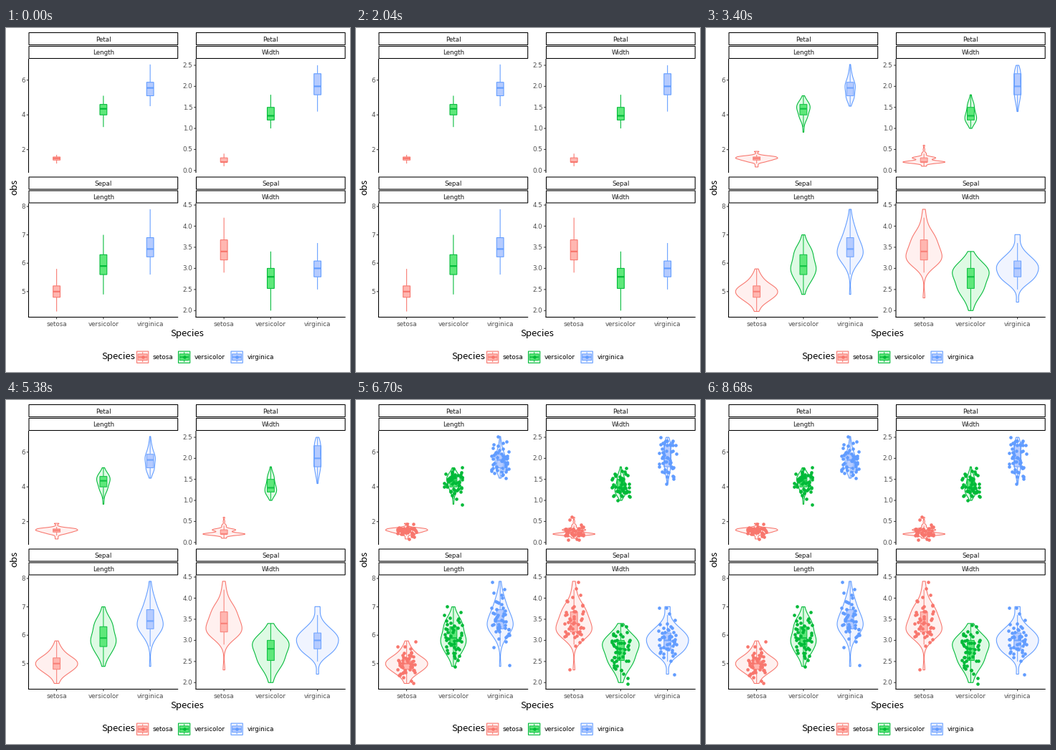
A matplotlib script that plays this animation: 480 by 480 pixels, repeating every 10 s.

```python
import numpy as np
import matplotlib.pyplot as plt
from matplotlib.animation import FuncAnimation
from matplotlib.colors import to_rgba
from matplotlib.patches import Rectangle

SIZE, DPI = 480, 72          # at 72 dpi one point is one pixel
STEP, LOOP = 100, 10000      # ms
VIOLINS_AT, DOTS_AT = 3400, 6700

SPECIES = ["setosa", "versicolor", "virginica"]
LINES = ["#F8766D", "#00BA38", "#619CFF"]
FILLS = ["#FFB6B0", "#5EE87A", "#B5CBFF"]
VEIL = 0.2                   # opacity of the violin fill
THIN, THICK = 1.07, 2.13
PITCH = 65.25                # distance between two categories
COUNT = 50                   # values per group
TITLE = dict(size=13.2, color="black", family="Noto Sans CJK JP")

plt.rcParams["font.family"] = "DejaVu Sans"
plt.rcParams["path.snap"] = False
fig = plt.figure(figsize=(SIZE / DPI, SIZE / DPI), dpi=DPI, facecolor="white")
ax = fig.add_axes([0, 0, 1, 1])
ax.set(xlim=(0, SIZE), ylim=(SIZE, 0))
ax.axis("off")
rng = np.random.default_rng(7)
violins, dots = [], []


def line(x, y, color, width=THIN, z=1, **kw):
    return ax.plot(x, y, color=color, lw=width, zorder=z,
                   solid_capstyle="butt", **kw)[0]


def box(x0, y0, x1, y1, edge, fill="none", z=1):
    ax.add_patch(Rectangle((x0, y0), x1 - x0, y1 - y0, ec=edge, fc=fill,
                           lw=THIN, zorder=z, joinstyle="miter"))


def label(x, y, text, size=8.8, color="#4D4D4D", ha="center", **kw):
    ax.text(x, y, text, fontsize=size, color=color, ha=ha,
            va="baseline", **kw)


def dot(x, y, color):
    return line(x, y, color, 0, 4, marker="o", ms=4.6, mew=0)


def sample(summary, outliers):
    """Bell-shaped values, rounded to 0.1, that follow a box summary."""
    z = np.linspace(-3, 3, 601)
    cdf = np.cumsum(np.exp(-z * z / 2))
    n = COUNT - len(outliers)
    scores = np.interp((np.arange(n) + 0.5) / n, cdf / cdf[-1], z)
    knots = [scores[0], -0.674, 0, 0.674, scores[-1]]
    body = np.interp(scores, knots, summary).round(1)
    return np.sort(np.r_[body, outliers])


def density(v, iqr):
    """Gaussian kernel density over the range of the values."""
    bw = 0.9 * min(v.std(ddof=1), iqr / 1.34) * len(v) ** -0.2
    grid = np.linspace(v[0], v[-1], 256)
    bell = np.exp(-0.5 * ((grid[:, None] - v) / bw) ** 2)
    return grid, bell.sum(1) / bw


def boxplot(x, summary, to_y, color, fill):
    low, q1, mid, q3, high = map(to_y, summary)
    half = 0.075 * PITCH
    line([x, x], [low, q1], color)
    line([x, x], [q3, high], color)
    box(x - half, q3, x + half, q1, color, fill)
    line([x - half, x + half], [mid, mid], color, THICK)


def violin(x, grid, half, to_y, color, fill):
    xs = np.r_[x - half, (x + half)[::-1]]
    ys = to_y(np.r_[grid, grid[::-1]])
    violins.extend(ax.fill(xs, ys, fc=to_rgba(fill, VEIL), ec=color,
                           lw=THIN, zorder=2))


def jitter(x, v, to_y, color):
    dx = rng.uniform(-0.2, 0.2, len(v)) * PITCH
    dy = rng.uniform(-0.04, 0.04, len(v))
    dots.append(dot(x + dx, to_y(v + dy), color))


def panel(left, top, names, ticks, y_first, unit, groups):
    """One facet; each group is (box summary, outliers)."""
    right, bottom = left + 208.7, top + 159

    def to_y(v):
        return y_first - (v - ticks[0]) * unit

    for i, name in enumerate(names):
        y = top - 36.5 + 19 * i
        box(left + 0.5, y, right - 0.5, y + 17, "black")
        label((left + right) / 2, y + 12.4 - 0.6 * i, name, color="#1A1A1A")

    line([left, left], [top, bottom], "black")
    for t in ticks:
        line([left - 2.75, left], [to_y(t)] * 2, "#333333")
        label(left - 4.6, to_y(t) + 3, f"{t}", ha="right")

    centers = left + PITCH * (0.6 + np.arange(3))
    if top > SIZE / 2:
        line([left - 0.5, right], [bottom, bottom], "black")
        for x, name in zip(centers, SPECIES):
            line([x, x], [bottom, bottom + 2.75], "#333333")
            label(x, bottom + 12.4, name)

    values = [sample(*group) for group in groups]
    shapes = [density(v, s[3] - s[1]) for v, (s, _) in zip(values, groups)]
    peak = max(d.max() for _, d in shapes)
    for x, v, (grid, d), (summary, _), color, fill in zip(
            centers, values, shapes, groups, LINES, FILLS):
        boxplot(x, summary, to_y, color, fill)
        violin(x, grid, 0.45 * PITCH * d / peak, to_y, color, fill)
        jitter(x, v, to_y, color)


def legend_key(x, y, color, fill):
    s = 17.28
    cx, cy = x + s / 2, y + s / 2
    for a, b in ((0.1, 0.25), (0.75, 0.9)):
        line([cx, cx], [y + a * s, y + b * s], color)
    box(x + 0.125 * s, y + 0.25 * s, x + 0.875 * s, y + 0.75 * s, color, fill)
    line([x + 0.125 * s, x + 0.875 * s], [cy, cy], color, THICK)
    box(x + 0.5, y + 0.5, x + s - 0.5, y + s - 0.5, color,
        to_rgba(fill, VEIL), 2)
    dot([cx], [cy], color)


panel(31.5, 43, ["Petal", "Length"], range(2, 7, 2), 169.7, 24.25, [
    ((1.2, 1.4, 1.5, 1.575, 1.7), (1.0, 1.1, 1.9, 1.9)),
    ((3.3, 4.0, 4.35, 4.6, 5.1), (3.0,)),
    ((4.5, 5.1, 5.55, 5.875, 6.9), ()),
])
panel(265, 43, ["Petal", "Width"], np.arange(0, 2.6, 0.5), 198.8, 58.7, [
    ((0.1, 0.2, 0.2, 0.3, 0.4), (0.5, 0.6)),
    ((1.0, 1.2, 1.3, 1.5, 1.8), ()),
    ((1.4, 1.8, 2.0, 2.3, 2.5), ()),
])
panel(31.5, 244.5, ["Sepal", "Length"], range(5, 9), 367.8, 39.6, [
    ((4.3, 4.8, 5.0, 5.2, 5.8), ()),
    ((4.9, 5.6, 5.9, 6.3, 7.0), ()),
    ((5.6, 6.225, 6.5, 6.9, 7.9), (4.9,)),
])
panel(265, 244.5, ["Sepal", "Width"], np.arange(2, 4.6, 0.5), 394.3, 58.9, [
    ((2.9, 3.2, 3.4, 3.675, 4.2), (2.3, 4.4)),
    ((2.0, 2.525, 2.8, 3.0, 3.4), ()),
    ((2.5, 2.8, 3.0, 3.175, 3.6), (2.2, 3.8, 3.8)),
])

label(252.5, 430, "Species", **TITLE)
label(15.2, 222, "obs", rotation=90, rotation_mode="anchor", **TITLE)
label(133, 462, "Species", ha="left", **TITLE)
for x, name, color, fill in zip((182, 240, 313.5), SPECIES, LINES, FILLS):
    legend_key(x, 450.6, color, fill)
    label(x + 22.8, 462.2, name, color="black", ha="left")


def update(i):
    t = i * STEP
    for shape in violins:
        shape.set_visible(t >= VIOLINS_AT)
    for cloud in dots:
        cloud.set_visible(t >= DOTS_AT)
    return violins + dots


anim = FuncAnimation(fig, update, frames=LOOP // STEP, interval=STEP,
                     repeat=True, repeat_delay=0)
plt.show()
```
